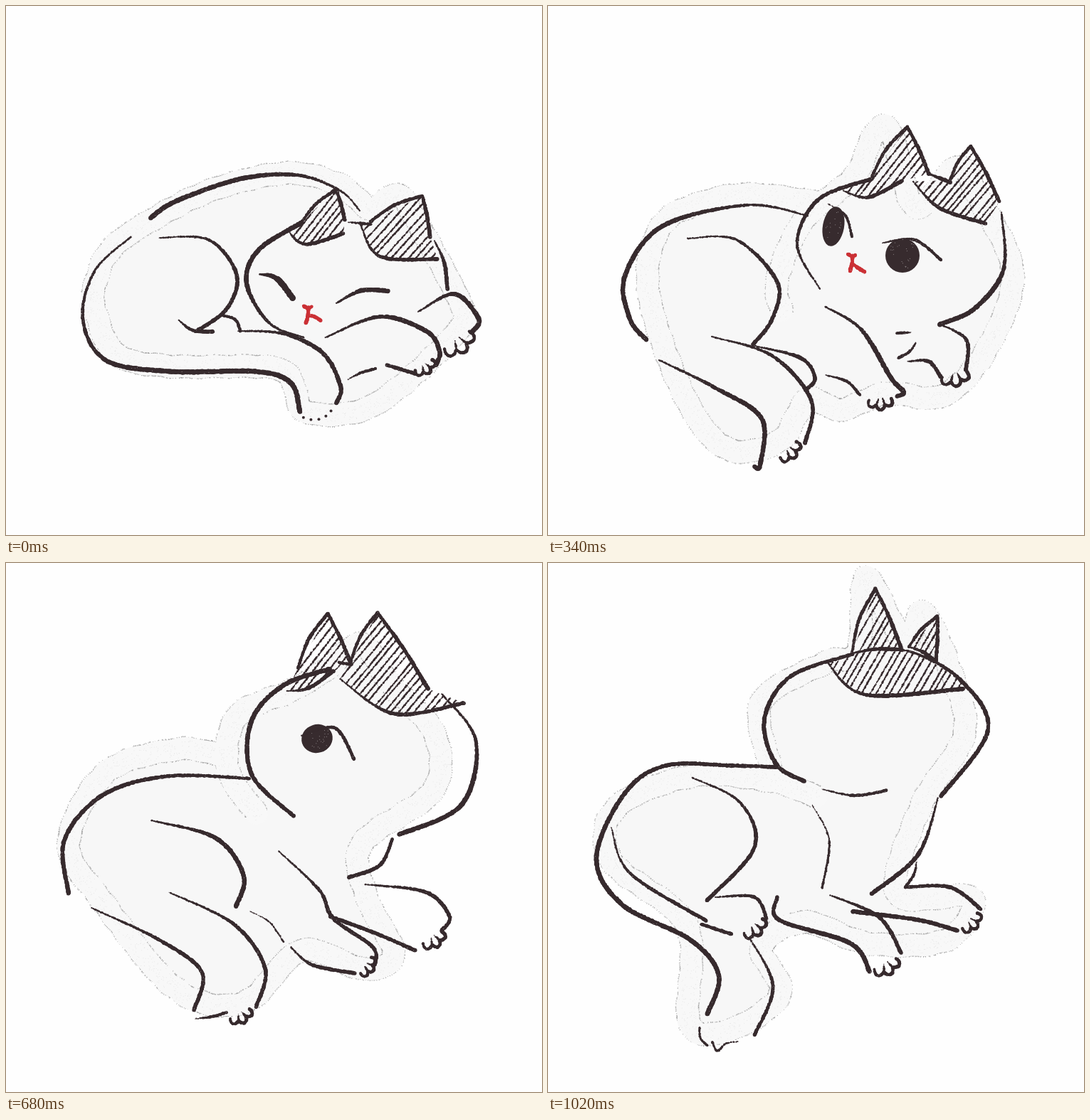
Recreate the animation shown at these times as an HTML page with a canvas. Size 753 by 744 pixels, loop 1190 ms.

```html
<!DOCTYPE html>
<html lang="en">
<head>
<meta charset="utf-8">
<title>Cat waking up</title>
<style>
html, body { margin: 0; width: 100%; height: 100%; overflow: hidden; background: #fefefe; }
canvas {
  position: absolute; left: 0; top: 0; visibility: hidden;
  animation: pose 1190ms step-end infinite;
  animation-delay: calc(var(--i) * 170ms - 1190ms);
}
@keyframes pose {
  0% { visibility: visible; }
  14.2858%, 100% { visibility: hidden; }
}
</style>
</head>
<body>
<script>
const INK = '#372b2e', RED = '#cb3136', FUR = '#f7f7f7', BAND = '#f8f8f8';
let ctx, seed = 7;

function rand() {
  seed = (seed * 1664525 + 1013904223) >>> 0;
  return seed / 4294967296;
}
const spread = d => (rand() - 0.5) * d;
const mix = (a, b, u) => a + (b - a) * u;

// Catmull-Rom through x, y pairs, sampled about once per pixel
function curve(p) {
  const out = [], last = p.length / 2 - 1;
  const at = (i, k) => p[2 * Math.max(0, Math.min(last, i)) + k];
  for (let i = 0; i < last; i++) {
    const n = Math.ceil(Math.hypot(at(i + 1, 0) - at(i, 0), at(i + 1, 1) - at(i, 1))) || 1;
    for (let j = 0; j < n; j++) {
      const t = j / n;
      out.push([0, 1].map(k => {
        const a = at(i - 1, k), b = at(i, k), c = at(i + 1, k), d = at(i + 2, k);
        return b + t / 2 * (c - a + t * (2 * a - 5 * b + 4 * c - d + t * (3 * (b - c) + d - a)));
      }));
    }
  }
  out.push([at(last, 0), at(last, 1)]);
  return out;
}

function outline(pts) {
  const path = new Path2D();
  for (const [x, y] of pts) path.lineTo(x, y);
  return path;
}

function dot(x, y, r, color) {
  ctx.fillStyle = color;
  ctx.beginPath();
  ctx.arc(x, y, r, 0, 7);
  ctx.fill();
}

// Brush line that swells from a fine start to its full width
function ink(width, p, start = 0.3, color = INK) {
  const pts = curve(p), grain = [];
  pts.forEach(([x, y], i) => {
    const w = width * mix(start, 1, Math.min(1, 2 * i / pts.length));
    dot(x + spread(0.7), y + spread(0.7), Math.max(0.4, w / 2 + spread(0.9)), color);
    if (w > 3 && rand() < 0.06) grain.push([x + spread(w), y + spread(w)]);
  });
  for (const [x, y] of grain) dot(x, y, 0.45, '#d8d4d4');
}

// Straight line bent sideways by a share of its length
function bow(width, x, y, u, v, bend) {
  ink(width, [x, y, (x + u) / 2 + (v - y) * bend, (y + v) / 2 - (u - x) * bend, u, v], 0.8);
}

function hatch(degrees, pts) {
  const a = degrees * Math.PI / 180, c = Math.cos(a), s = Math.sin(a), reach = 110;
  const [mx, my] = [0, 1].map(k => pts.reduce((sum, p) => sum + p[k], 0) / pts.length);
  ctx.save();
  ctx.clip(outline(pts));
  for (let d = -reach; d < reach; d += 8.5 + spread(2)) {
    const x = mx + d * s, y = my + d * c, r = reach + spread(9);
    ink(2.2, [x - r * c, y + r * s, x + spread(4), y + spread(4), x + r * c, y - r * s], 0.8);
  }
  ctx.restore();
}

// Two sides meeting in a tip, shaded down to the rim of the cap
function ear(degrees, x0, y0, x, y, x1, y1, rim) {
  hatch(degrees, [[x0, y0], [x, y], [x1, y1], ...curve(rim).reverse()]);
  bow(4.5, x0, y0, x, y, 0.07);
  bow(5, x, y, x1, y1, 0.02);
  ink(5, rim);
}

// Three scalloped toes with a crease between each
function paw(x, y, r, turn) {
  const edge = [], at = (a, k) => [x + Math.cos(a) * r * k, y + Math.sin(a) * r * k];
  for (let k = 0; k <= 18; k++) edge.push(...at(turn + 1.1 - k * 0.122, 0.8 + 0.25 * Math.sin(k % 6 * Math.PI / 6)));
  ink(4.5, edge, 0.8);
  for (const a of [turn - 0.37, turn + 0.37]) ink(3, [...at(a - 0.1, 0.35), ...at(a, 0.8)]);
}

function nose(x, y, u, v) {
  ink(5, [x - 7, y - 2, x, y + 1, x + 4, y - 1], 1, RED);
  ink(5, [x, y, x - 1, y + 12, x - 4, y + 22], 1, RED);
  ink(5, [x, y + 11, (x + u) / 2, v - 5, u, v], 0.8, RED);
}

function pupil(x, y, rx, ry, turn = 0) {
  ctx.fillStyle = INK;
  ctx.beginPath();
  ctx.ellipse(x, y, rx, ry, turn, 0, 7);
  ctx.fill();
  for (let i = 0; i < rx; i++) dot(x + spread(rx * 1.4), y + spread(ry * 1.5), 0.5, '#a39c9d');
}

// Pale fur with a grainy chalk band along its rim
function halo(p) {
  const pts = curve(p).map(([x, y], i) => [x + Math.sin(i * 0.21) * 0.8, y + Math.cos(i * 0.17) * 0.8]);
  const path = outline(pts);
  ctx.fillStyle = FUR;
  ctx.fill(path);
  ctx.strokeStyle = '#a2a2a2';
  ctx.lineWidth = 1;
  ctx.beginPath();
  pts.forEach(([x, y], i) => {
    if (rand() > 0.6) return;
    const [x0, y0] = pts[Math.max(0, i - 3)], [x1, y1] = pts[Math.min(pts.length - 1, i + 3)];
    const d = Math.hypot(x1 - x0, y1 - y0) || 1;
    const h = 15.5 + rand() * 1.7, nx = (y0 - y1) / d * h, ny = (x1 - x0) / d * h;
    ctx.moveTo(x - nx, y - ny);
    ctx.lineTo(x + nx, y + ny);
  });
  ctx.stroke();
  ctx.strokeStyle = BAND;
  ctx.lineWidth = 30.6;
  ctx.lineCap = ctx.lineJoin = 'round';
  ctx.stroke(path);
  for (const [x, y] of pts) dot(x + spread(22), y + spread(22), 0.5, '#e4e4e4');
}

function asleep() {
  halo([120,410, 145,345, 215,295, 300,255, 398,235, 470,252, 512,285, 550,265, 580,308, 637,415, 640,450, 560,530, 495,570, 420,570, 402,528, 370,508, 220,506, 150,485, 120,410]);
  ink(6, [497,288, 470,260, 410,238, 330,243, 240,274, 203,298]);
  ink(6.5, [175,325, 125,372, 108,440, 140,498, 230,514, 350,514, 400,530, 413,571]);
  ink(5, [215,326, 285,329, 324,378, 310,426, 270,456]);
  ink(5, [243,442, 262,456, 291,458]);
  ink(4, [303,435, 322,441, 329,457], 0.8);
  ink(5.5, [326,457, 390,461, 445,488, 470,535, 464,558]);
  for (let a = 0.5; a < 2.3; a += 0.4) dot(432 + Math.cos(a) * 28, 558 + Math.sin(a) * 24, 2, INK);
  ink(6, [418,466, 370,446, 338,390, 355,343, 415,305]);
  ear(52, 415,304, 464,258, 476,301, [394,313, 420,335, 474,320]);
  ink(4, [481,304, 513,307]);
  ear(48, 512,303, 585,267, 596,325, [498,308, 525,352, 606,356]);
  ink(5, [602,330, 616,362, 620,398]);
  ink(8, [357,377, 380,383, 403,411]);
  ink(6, [464,418, 500,400, 537,401]);
  nose(425, 424, 442, 442);
  ink(6, [449,466, 525,437, 590,457, 609,485, 604,505]);
  ink(5, [535,505, 575,517], 0.9);
  paw(583, 499, 20, 1);
  ink(6, [579,430, 630,405, 664,440, 655,458]);
  paw(627, 461, 30, 0.95);
  ink(4, [481,525, 498,516, 519,510]);
}

function peeking() {
  halo([101,410, 130,340, 200,294, 290,257, 380,247, 425,262, 478,215, 495,211, 511,266, 548,228, 605,285, 638,380, 620,485, 550,543, 435,550, 408,601, 345,585, 300,528, 220,502, 130,465, 101,410]);
  ink(6, [437,258, 350,252, 220,285, 130,353, 106,420, 145,490, 252,520]);
  ink(4.5, [183,341, 250,319, 315,348, 318,395, 291,448]);
  ink(4.5, [239,420, 265,451, 345,460, 405,481]);
  ink(3, [422,486, 455,520, 461,556]);
  ink(6, [270,517, 350,517, 400,548, 402,589]);
  paw(425, 578, 12, 1.3);
  ink(5, [358,455, 326,385, 355,319, 420,285], 0.8);
  ear(70, 412,292, 474,242, 485,290, [385,312, 440,318, 487,290]);
  ink(2, [486,272, 495,272, 494,280]);
  ink(4, [470,297, 510,298]);
  ear(72, 510,297, 560,240, 592,306, [507,310, 550,335, 608,329]);
  ink(6, [594,303, 625,350, 622,405]);
  ink(3.5, [617,422, 600,436, 578,444], 0.8);
  ink(4.5, [349,363, 388,382, 398,411]);
  pupil(375, 378, 13, 8, 0.5);
  ink(4, [466,413, 505,395, 543,396]);
  pupil(495, 406, 18, 10, -0.25);
  nose(423, 424, 442, 449);
  ink(5.5, [430,470, 500,465, 570,485, 604,512, 597,527]);
  paw(566, 527, 25, 1);
  ink(5, [545,465, 595,443, 646,462, 637,478]);
  paw(613, 479, 28, 0.6);
  ink(4, [527,551, 510,535, 485,525]);
}

function alert() {
  halo([328,428, 322,385, 360,300, 430,240, 458,180, 482,178, 516,283, 575,226, 605,270, 653,375, 618,480, 555,548, 475,545, 410,568, 365,553, 325,612, 250,622, 190,545, 141,400, 160,308, 225,274, 290,265, 385,277]);
  ink(6, [365,295, 280,280, 160,310, 108,380, 115,440, 138,469]);
  ink(5, [196,327, 265,329, 322,388, 315,440, 288,476]);
  ink(6, [156,498, 235,537, 300,580, 298,645, 290,648]);
  ink(5, [230,465, 315,492, 370,555, 361,615]);
  ink(5, [290,478, 355,495, 375,523, 362,540]);
  paw(332, 618, 22, 0.8);
  ink(5, [382,398, 350,335, 380,272, 455,243]);
  ear(52, 455,240, 505,170, 535,236, [415,260, 450,269, 497,246]);
  ink(5, [535,236, 565,248]);
  ear(50, 565,245, 594,197, 634,275, [513,247, 550,284, 615,306]);
  ink(6, [637,290, 640,370, 600,425, 550,448]);
  ink(4, [510,459, 490,460]);
  ink(4, [517,473, 508,486, 492,495]);
  ink(5, [550,447, 588,470, 587,512]);
  ink(5, [505,500, 535,500, 552,522]);
  paw(569, 509, 25, 1.35);
  ink(6, [390,423, 440,455, 482,523, 500,543, 490,549]);
  paw(466, 545, 22, 1.5);
  ink(4, [390,519, 420,528, 438,547]);
  pupil(401, 310, 15, 28, 0.18);
  ink(3.5, [393,278, 418,295, 427,325]);
  pupil(498, 351, 24, 24);
  ink(4, [470,333, 515,329, 552,357]);
  nose(428, 351, 445, 374);
}

function arching() {
  halo([338,374, 315,305, 350,232, 408,183, 442,128, 468,170, 495,212, 562,181, 605,235, 632,325, 583,425, 597,485, 530,526, 430,567, 362,574, 320,617, 245,600, 145,455, 113,350, 150,265, 250,250, 315,285]);
  ink(6, [343,277, 300,242, 225,230, 150,260, 110,325], 0.8);
  ink(5, [112,440, 101,380, 108,325]);
  ink(5.5, [223,291, 300,318, 322,370, 285,462]);
  ink(2, [191,357, 193,390, 207,420]);
  ink(5, [202,430, 290,467, 360,528, 384,628]);
  ink(5.5, [124,449, 200,490, 290,540, 324,621], 0.7);
  ink(3, [327,486, 312,465, 295,452]);
  ink(5, [380,493, 367,471, 342,463]);
  paw(346, 631, 18, 1.1);
  ink(5.5, [465,197, 400,218, 345,280, 350,343, 392,376]);
  ear(38, 449,195, 490,147, 511,189, [415,214, 450,228, 508,215]);
  ink(4, [490,190, 515,202, 542,220]);
  ear(35, 535,202, 589,167, 622,272, [512,215, 550,270, 620,273]);
  ink(6, [622,272, 641,335, 605,392, 546,408], 0.7);
  ink(4, [462,403, 490,410, 525,410]);
  ink(5.5, [512,413, 537,470, 600,497, 603,514]);
  ink(5, [484,507, 520,528, 560,542], 0.7);
  paw(581, 519, 24, 0.9);
  ink(5.5, [368,380, 420,420, 460,508, 500,553]);
  ink(5, [385,504, 415,560, 480,586]);
  paw(478, 569, 19, 0.5);
  ink(3, [455,485, 475,486, 487,466]);
  pupil(392, 263, 14, 17);
  ink(4, [378,238, 402,247, 411,285]);
  pupil(482, 315, 22, 15, -0.15);
  ink(5, [465,312, 510,303, 531,327]);
  nose(412, 305, 444, 334);
}

function lookingUp() {
  halo([352,352, 312,290, 325,215, 400,180, 450,150, 500,114, 540,170, 602,240, 600,320, 500,395, 507,470, 545,550, 502,571, 415,545, 335,618, 240,600, 135,475, 88,395, 140,295, 240,262, 300,270]);
  ink(5.5, [342,303, 225,300, 135,327, 82,390, 88,465], 0.7);
  ink(6, [204,362, 295,387, 334,440, 323,483]);
  ink(5, [120,485, 215,530, 275,575, 264,629]);
  ink(5, [229,463, 320,508, 364,570, 351,625]);
  ink(4, [266,641, 290,638, 310,632]);
  paw(325, 627, 21, 1.1);
  ink(2, [343,490, 370,505, 390,533]);
  ink(6, [404,356, 345,297, 345,222, 390,172, 455,149], 0.8);
  ear(52, 410,148, 452,71, 484,140, [395,180, 425,176, 460,152]);
  ink(4, [468,140, 485,143], 1);
  ear(50, 484,140, 522,70, 593,177, [469,163, 545,212, 643,197]);
  ink(6, [612,184, 660,250, 640,340, 552,382]);
  ink(5, [543,388, 525,425, 482,442], 0.8);
  ink(5, [504,452, 590,463, 623,497, 612,517]);
  ink(5, [455,497, 520,521, 575,545], 1);
  paw(595, 520, 22, 1);
  ink(5, [383,405, 440,460, 460,500, 515,540, 518,565]);
  ink(5, [400,540, 430,565, 490,577]);
  paw(500, 562, 19, 0.6);
  pupil(437, 247, 22, 20, -0.3);
  ink(4.5, [415,243, 462,232, 489,276]);
}

function turnedAway() {
  ink(6, [320,287, 260,285, 165,285, 107,325, 68,415, 105,481, 200,530, 240,580, 224,634], 0.8);
  ink(5, [203,302, 270,337, 290,400, 223,475]);
  ink(4.5, [89,372, 115,436, 222,503]);
  ink(4.5, [235,470, 290,470, 307,500]);
  ink(5, [215,508, 258,522], 0.8);
  paw(283, 504, 23, 0.9);
  ink(4.5, [283,527, 316,595, 290,664]);
  ink(3, [213,653, 214,668, 224,679], 0.8);
  ink(3, [267,673, 250,676, 238,686, 231,674]);
  ink(5.5, [428,128, 340,160, 304,220, 320,282, 360,307], 0.8);
  const crown = [445,122, 510,125, 580,165], rim = [391,138, 445,185, 583,177];
  hatch(60, [...curve(crown), ...curve(rim).reverse()]);
  ear(60, 427,127, 460,36, 497,122, [427,127, 461,121, 497,122]);
  ear(60, 507,118, 547,75, 545,138, [507,118, 526,125, 545,138]);
  ink(5.5, [...crown, 618,235, 552,328]);
  ink(5.5, rim);
  ink(4, [385,318, 430,327, 475,320]);
  ink(5.5, [548,330, 520,410, 455,465]);
  ink(3, [371,340, 395,390, 385,457]);
  ink(4, [518,420, 514,438, 502,456]);
  ink(5, [502,456, 565,456, 608,487], 0.8);
  ink(5.5, [428,490, 520,502, 575,517], 1);
  paw(587, 498, 21, 0.75);
  ink(5, [396,467, 465,498, 496,548]);
  ink(6, [322,470, 325,502, 425,535, 452,575], 0.8);
  paw(470, 556, 24, 1.1);
}

function turnedLow() {
  halo([402,355, 315,275, 310,195, 385,148, 425,135, 442,68, 498,120, 530,82, 585,155, 615,235, 565,300, 500,360, 515,480, 582,522, 530,562, 430,524, 345,515, 355,595, 290,645, 215,655, 225,515, 130,440, 52,410, 90,345, 200,285, 305,276]);
  turnedAway();
}

function turnedHigh() {
  halo([312,285, 300,195, 390,140, 435,125, 447,20, 500,110, 527,69, 565,150, 585,240, 525,340, 490,465, 595,470, 560,530, 450,535, 360,505, 300,540, 327,605, 260,655, 199,648, 195,510, 90,420, 95,345, 200,300, 310,306, 376,328]);
  turnedAway();
}

[asleep, peeking, alert, arching, lookingUp, turnedLow, turnedHigh].forEach((draw, i) => {
  const c = document.createElement('canvas');
  c.width = 753;
  c.height = 744;
  c.style.setProperty('--i', i);
  ctx = c.getContext('2d');
  ctx.fillStyle = '#fefefe';
  ctx.fillRect(0, 0, 753, 744);
  draw();
  document.body.append(c);
});
</script>
</body>
</html>
```
